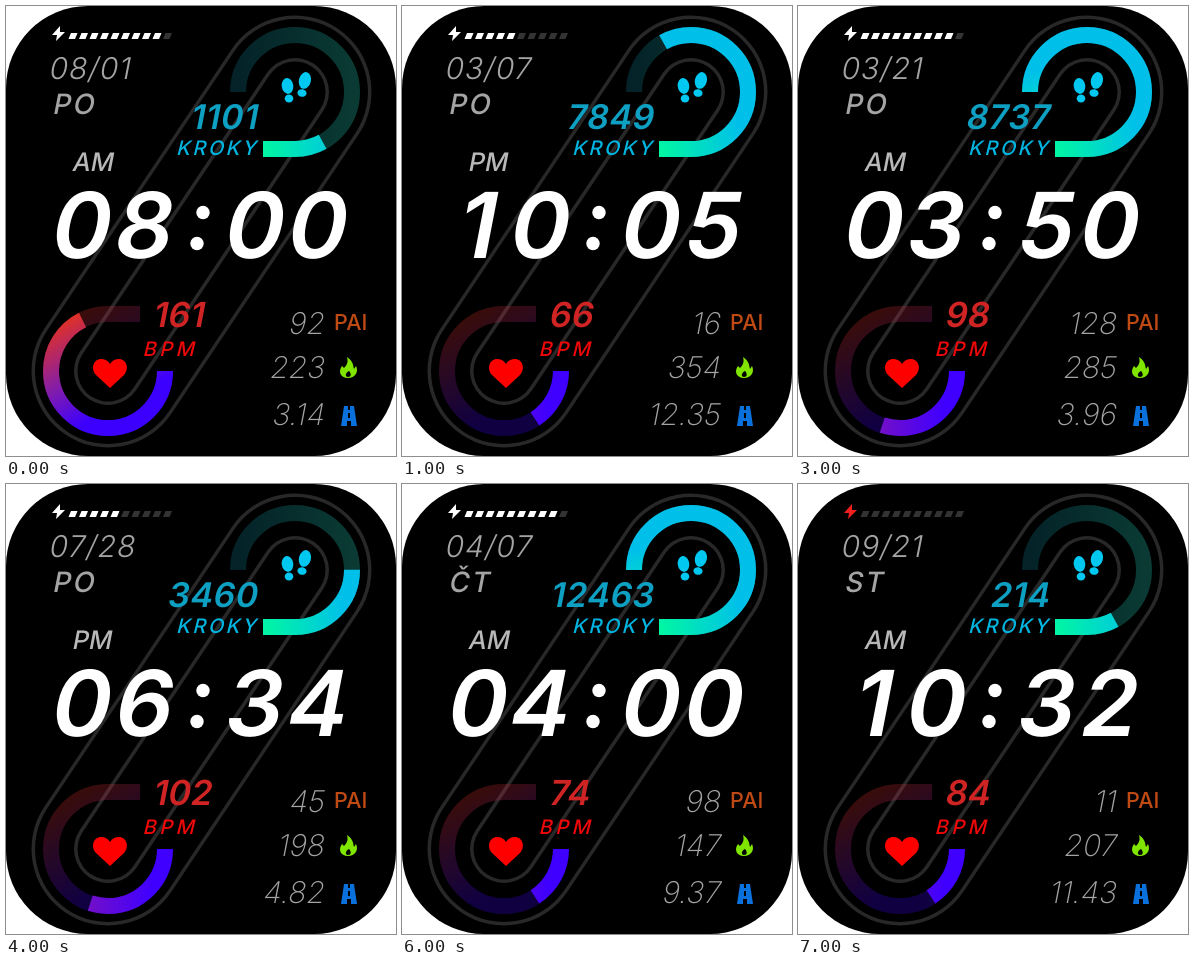
Recreate the animation shown at these times as an HTML page. Size 390 by 450 pixels, loop 8000 ms.

```html
<!DOCTYPE html>
<html lang="cs">
<head>
<meta charset="utf-8">
<title>Watch face</title>
<style>
  html, body { margin: 0; width: 100%; height: 100%; overflow: hidden; background: #fff; }
  svg { display: block; width: 390px; height: 450px; }
  text { font-family: Inter, Roboto, sans-serif; }
  .ring { fill: none; stroke-width: 16; }
</style>
</head>
<body>
<svg id="face" viewBox="0 0 390 450">
  <defs>
    <radialGradient id="aqua" gradientUnits="userSpaceOnUse" cx="257" cy="146" r="84">
      <stop stop-color="#00f8a0"/><stop offset="1" stop-color="#00c0ea"/>
    </radialGradient>
    <linearGradient id="aquaDim" gradientUnits="userSpaceOnUse" x1="230" y1="0" x2="345" y2="0">
      <stop stop-color="#042228"/><stop offset="1" stop-color="#0a3a33"/>
    </linearGradient>
    <linearGradient id="warm" gradientUnits="userSpaceOnUse" x1="62" y1="315" x2="115" y2="410">
      <stop stop-color="#dc302c"/><stop offset=".45" stop-color="#8a1fa0"/><stop offset=".9" stop-color="#3c00ff"/>
    </linearGradient>
    <linearGradient id="violet" gradientUnits="userSpaceOnUse" x1="45" y1="0" x2="145" y2="0">
      <stop stop-color="#9018a8"/><stop offset="1" stop-color="#4000ff"/>
    </linearGradient>
    <path id="stepPath" d="M257 143H289A57 57 0 1 0 232 86"/>
    <path id="pulsePath" d="M159 365A57 57 0 1 1 102 308H134"/>
    <path id="track" d="M289 86L102 365"/>
  </defs>

  <rect width="390" height="450" rx="82"/>
  <g stroke-linecap="round">
    <use href="#track" stroke="#282828" stroke-width="153"/>
    <use href="#track" stroke="#000" stroke-width="146"/>
    <use href="#track" stroke="#282828" stroke-width="68"/>
    <use href="#track" stroke="#000" stroke-width="61"/>
  </g>

  <use href="#stepPath" class="ring" stroke="url(#aquaDim)"/>
  <use href="#stepPath" class="ring" stroke="url(#aqua)" id="stepRing"/>
  <use href="#pulsePath" class="ring" stroke="url(#warm)" opacity=".26"/>
  <use href="#pulsePath" class="ring" id="pulseRing"/>

  <g fill="#00c8f0">
    <ellipse cx="281.500" cy="80" rx="5.800" ry="8" transform="rotate(-8 281 80)"/>
    <ellipse cx="283" cy="92.500" rx="4.300" ry="4"/>
    <ellipse cx="299" cy="74.500" rx="6" ry="8.500" transform="rotate(14 299 74)"/>
    <ellipse cx="296" cy="87" rx="4.600" ry="3.800" transform="rotate(12 296 87)"/>
  </g>
  <path fill="#f00" d="M104 382L90 369C84 362 88 353 95 353Q101 353 104 358Q107 353 113 353C120 353 124 362 118 369Z"/>
  <path fill="#80e600" d="M341 351C348 356 347 360 348 363L350 360C353 366 349 372 342 372C334 372 332 365 336 360L338 362C342 358 342 355 341 351ZM343 365C339 367 339 371 342 371C346 371 345 367 343 365Z"/>
  <path fill="#0a70dc" d="M338 400H342V404H344V400H348L351 420H345V415H341V420H335ZM342 407V412H344V407Z"/>
  <path id="bolt" d="M54 20L46 29H51L50 35L59 26H54Z"/>
  <g id="bars"></g>
  <g fill="#fff"><circle cx="197" cy="206.500" r="6.700"/><circle cx="191" cy="237.500" r="6.700"/></g>
</svg>

<script>
const $ = id => document.getElementById(id);
const face = $('face');

function add(parent, tag, attrs) {
  const node = document.createElementNS('http://www.w3.org/2000/svg', tag);
  for (const name in attrs) node.setAttribute(name, attrs[name]);
  return parent.appendChild(node);
}

function label(x, y, size, weight, fill, anchor = 'start', spacing = 0, skew = -11) {
  return add(face, 'text', {
    transform: `translate(${x} ${y}) skewX(${skew})`, fill, 'text-anchor': anchor,
    'font-size': size, 'font-weight': weight, 'letter-spacing': spacing
  });
}

const bars = Array.from({ length: 10 }, (_, i) =>
  add($('bars'), 'path', { d: `M${65 + i * 10.5} 27h6.500l-2.500 6h-6.500z` }));

label(170, 149, 20, 500, '#00b4e0', 'start', 2.500, -14).textContent = 'KROKY';
label(136.500, 350, 20, 500, '#f00808', 'start', 3.500, -14).textContent = 'BPM';
label(328, 324, 21.500, 500, '#c04a14', 'start', 0, 0).textContent = 'PAI';

const gray = '#a4a4a4';
const date = label(42, 73, 30, 300, gray, 'start', 1);
const day = label(46, 108, 28, 500, gray, 'start', 2);
const half = label(65.500, 165, 25.500, 500, '#b8b8b8');
const digits = [71, 133.500, 244, 307].map(x => label(x, 252, 91, 600, '#fff', 'middle'));
const steps = label(251, 123, 34, 600, '#0ea0c2', 'end', .5);
const pulse = label(146, 321, 34.500, 600, '#d02424');
const stats = [328, 372, 419].map(y => label(317.500, y, 30, 200, gray, 'end'));

// date, day, half, time, battery, steps, step angle, pulse, pulse angle, PAI, energy, distance
const states = [
  ['08/01', 'PO', 'AM', '0800', 9, 1101, 29, 161, 243, 92, 223, '3.14'],
  ['03/07', 'PO', 'PM', '1005', 5, 7849, 209, 66, 57, 16, 354, '12.35'],
  ['05/14', 'ST', 'PM', '0927', 7, 8215, 270, 154, 243, 64, 312, '5.27'],
  ['03/21', 'PO', 'AM', '0350', 9, 8737, 270, 98, 108, 128, 285, '3.96'],
  ['07/28', 'PO', 'PM', '0634', 5, 3460, 90, 102, 108, 45, 198, '4.82'],
  ['10/21', 'PÁ', 'AM', '1211', 7, 1348, 90, 121, 150, 87, 207, '6.11'],
  ['04/07', 'ČT', 'AM', '0400', 9, 12463, 270, 74, 57, 98, 147, '9.37'],
  ['09/21', 'ST', 'AM', '1032', 0, 214, 29, 84, 57, 11, 207, '11.43']
];

const arc = degrees => degrees * Math.PI / 180 * 57;
const fillRing = (ring, length) => ring.setAttribute('stroke-dasharray', `${length} 999`);

function show([dateText, dayText, halfText, time, battery, stepCount, stepAngle, rate, rateAngle, ...values]) {
  date.textContent = dateText;
  day.textContent = dayText;
  half.textContent = halfText;
  digits.forEach((digit, i) => digit.textContent = time[i]);
  steps.textContent = stepCount;
  pulse.textContent = rate;
  stats.forEach((stat, i) => stat.textContent = values[i]);
  bars.forEach((bar, i) => bar.setAttribute('fill', i < battery ? '#fff' : '#333'));
  $('bolt').setAttribute('fill', battery ? '#fff' : '#f02020');
  fillRing($('stepRing'), 32 + arc(stepAngle));
  fillRing($('pulseRing'), arc(rateAngle));
  $('pulseRing').setAttribute('stroke', rateAngle > 180 ? 'url(#warm)' : 'url(#violet)');
}

let current = -1;
function tick() {
  const index = Math.floor(performance.now() / 1000) % states.length;
  if (index !== current) show(states[current = index]);
  requestAnimationFrame(tick);
}
tick();
</script>
</body>
</html>
```
